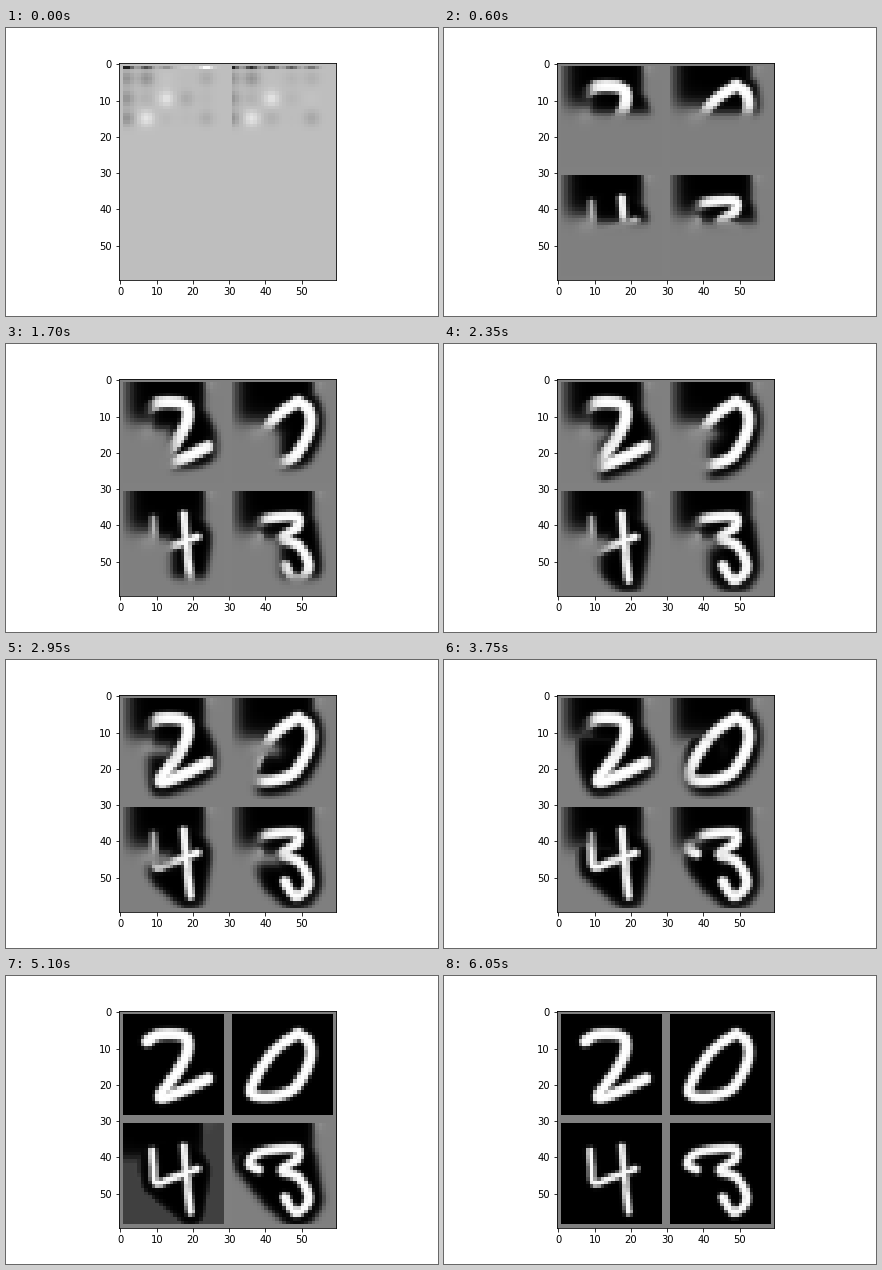
Recreate the animation shown at these times as a matplotlib script. Size 432 px wide and 288 px high, loop 6400 ms.

```python
import numpy as np
import matplotlib.pyplot as plt
from matplotlib.animation import FuncAnimation

FRAMES, STEP_MS = 128, 50
SIZE, CELL = 28, 30
SWEEP_START, FILL_START = 13, 90
X, Y = np.meshgrid(np.arange(SIZE) + 0.5, np.arange(SIZE) + 0.5)


def sigmoid(z):
    return 0.5 + 0.5 * np.tanh(z / 2)


def ramp(k, start, length):
    return float(np.clip((k - start) / length, 0, 1))


def box(cx, cy, hx, hy, soft=0.7):
    return sigmoid((hx - abs(X - cx)) / soft) * sigmoid((hy - abs(Y - cy)) / soft)


def spot(x, y, sigma=1.5):
    return np.exp(-((X - x)**2 + (Y - y)**2) / (2 * sigma**2))


def curve(points, samples=14):
    """Catmull-Rom curve through the key points."""
    p = np.array([points[0], *points, points[-1]], float)
    u = np.linspace(0, 1, samples)[:, None]
    return np.vstack([
        0.5 * (2 * b + (c - a) * u + (2 * a - 5 * b + 4 * c - d) * u**2
               + (3 * b - a - 3 * c + d) * u**3)
        for a, b, c, d in zip(p, p[1:], p[2:], p[3:])])


class Digit:
    def __init__(self, half_width, *strokes):
        ink = np.vstack([curve(s) for s in strokes])
        self.half_width = half_width
        self.distance = np.min([np.hypot(X - x, Y - y) for x, y in ink], axis=0)
        # Distance outside the convex hull, from its supporting lines.
        self.outside = np.max([
            X * np.cos(a) + Y * np.sin(a) - np.max(ink @ [np.cos(a), np.sin(a)])
            for a in np.linspace(0, 2 * np.pi, 36, endpoint=False)], axis=0)


DIGITS = [
    Digit(1.5, [(6.8, 7.7), (10, 5.8), (16.5, 6.1), (18, 9.3), (15.8, 15),
                (10.4, 22.6), (14, 22.3), (23.5, 17.9)]),
    Digit(1.4, [(18.3, 5.4), (21.3, 8), (21.5, 13), (17.5, 20.3), (12, 22.7),
                (6.5, 22.6), (5.6, 19.8), (11.2, 10.8), (18.3, 5.4)]),
    Digit(0.95, [(8.2, 7.8), (8.5, 12), (9.2, 16.6), (14, 15.2), (20.5, 12.8)],
          [(16.8, 6.6), (17.3, 12), (18.7, 24.6)]),
    Digit(1.2, [(7.4, 13), (4.9, 11.2), (8, 8.2), (17.5, 7.2), (18, 10),
                (13.8, 13.2), (18.5, 15.2), (21.2, 21), (17.8, 24.8),
                (14.7, 20.6)]),
]


def window(k):
    """Attention window: wide along the top, then one clockwise round."""
    if k < SWEEP_START:
        return box(16.5, 4, 8.5, 9)
    angle = np.radians(3.5 * (k - 27))
    return box(15 + 5 * np.cos(angle), 14.5 + 8 * np.sin(angle), 6, 6.2)


COVER = np.maximum.accumulate([window(k) for k in range(FRAMES)])


def first_marks(left, last, rng):
    """Faint 5-wide grid of filter spots below a strong top row."""
    power = rng.normal(-0.03, 0.03, (3, 5))
    power[:, 0] = power[0, 1] = -0.17
    power[1, 2] = power[2, 1] = 0.15
    marks = sum(power[j, i] * spot(left + 5.5 * i, 3.5 + 5.5 * j)
                for j in range(3) for i in range(5))
    for i, strength in enumerate(np.linspace(-0.65, last, 5)):
        marks[0] += strength * np.exp(-((X[0] - left - 5.5 * i) / 1.8)**2)
    return marks


rng = np.random.default_rng(4)
MARKS = [first_marks(1, 0.27, rng), first_marks(0, -0.3, rng), 0 * X, 0 * X]
SMUDGE = 0.1 * spot(6.8, 13, 1.8) + 0.08 * spot(23.5, 0.5, 1.3)


def ground(k):
    return 0.5 + 0.245 * (1 - ramp(k, 0, 6))


def tile(k, n):
    digit = DIGITS[n]
    finish = ramp(k, FILL_START, 8)
    cover = np.maximum(COVER[k], finish)

    band = sigmoid((X - 1.5 + 6 * finish) / 1.1) * sigmoid((22.5 - X) / 0.5)
    band = band * sigmoid((11 - Y) / 1.3)
    halo = cover * sigmoid((4.1 - digit.outside) / 0.5)
    fill = ramp(k, FILL_START + 4 * n, 8)
    dark = np.maximum(np.maximum(band, halo), fill)

    width = digit.half_width + 0.15 * (1 - ramp(k, 92, 19))
    ink = cover * sigmoid((width - digit.distance) / 0.22)

    value = (0.5 + SMUDGE) * (1 - dark)
    value = value + (1 - value) * ink
    grown = ramp(k, 0, 9)
    return ground(k) + MARKS[n] * (1 - grown) + (value - 0.5) * grown


def grid(k):
    image = np.full((2 * CELL, 2 * CELL), ground(k))
    for n in range(4):
        top, left = CELL * (n // 2) + 1, CELL * (n % 2) + 1
        image[top:top + SIZE, left:left + SIZE] = tile(k, n)
    return np.clip(image, 0, 1)


fig, ax = plt.subplots(figsize=(6, 4), dpi=72, facecolor="white")
fig.subplots_adjust(left=0.125, right=0.9, bottom=0.125, top=0.88)
picture = ax.imshow(grid(0), cmap="gray", vmin=0, vmax=1, interpolation="nearest")
ax.set_xticks(range(0, 60, 10))
ax.set_yticks(range(0, 60, 10))


def update(k):
    picture.set_data(grid(k))
    return [picture]


animation = FuncAnimation(fig, update, frames=FRAMES, interval=STEP_MS, repeat=True)
plt.show()
```
